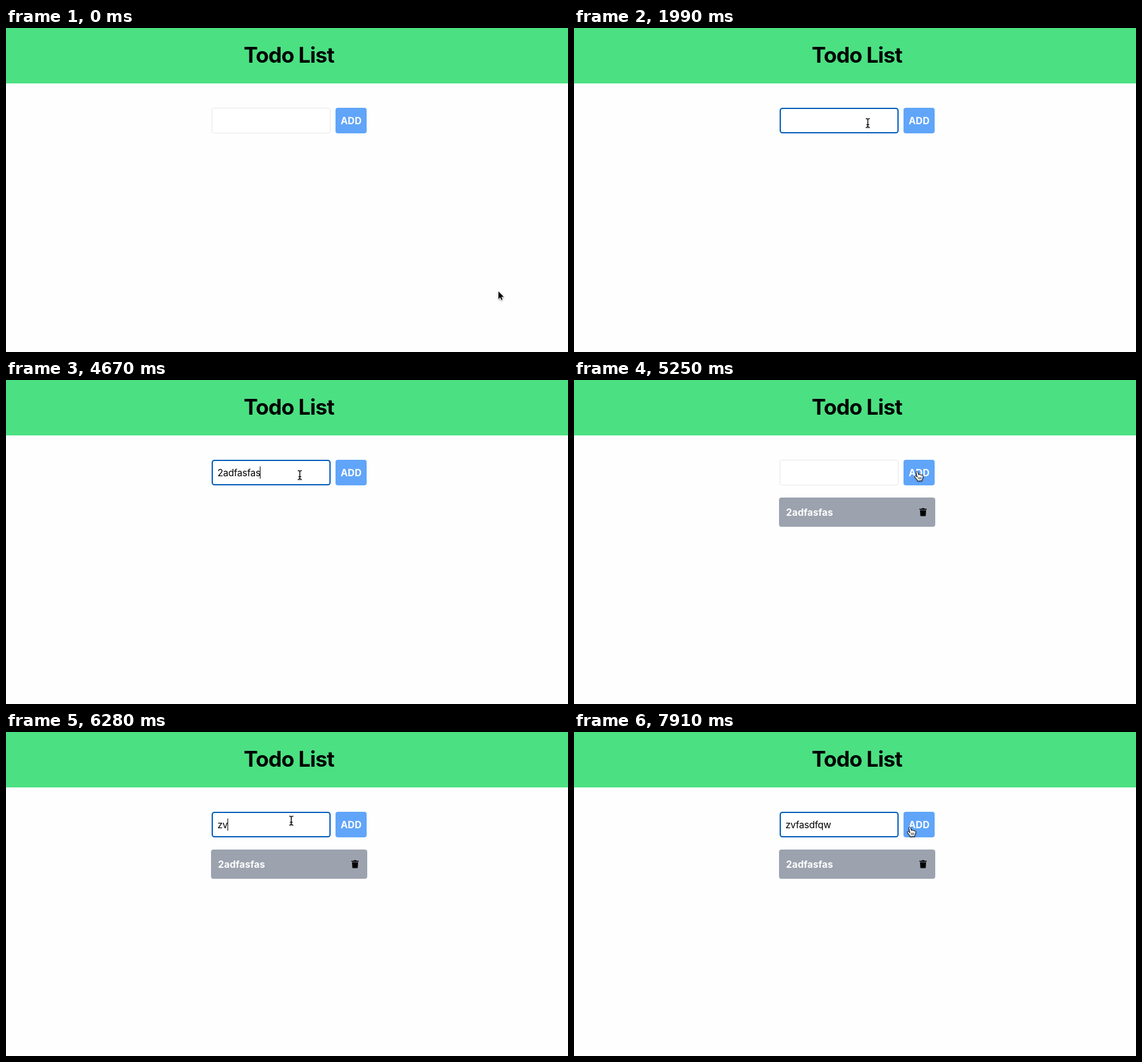
These frames come from a looping animation (921x532 px, 8 s). An HTML page:

```html
<!DOCTYPE html>
<html lang="en">
<head>
<meta charset="utf-8">
<title>Todo List</title>
<style>
  html, body { margin: 0; width: 100%; height: 100%; overflow: hidden; background: #fefefe; }
  svg { display: block; width: 921px; height: 532px; }
  text { font: 15.5px Inter, sans-serif; font-optical-sizing: none; white-space: pre; }
  .bold { font-weight: 700; letter-spacing: .01em; }
  #title { font-size: 35px; letter-spacing: -.023em; text-anchor: middle; }
  #typed { letter-spacing: -.0145em; }
  #pointer { filter: drop-shadow(0 1px 1px #0006); }
  .outlined { stroke: #fff; stroke-width: 1.6; paint-order: stroke; stroke-linejoin: round; }
</style>
</head>
<body>
<svg viewBox="0 0 921 532">
  <rect width="921" height="91" fill="#4be082"/>
  <text id="title" class="bold" x="463.6" y="57">Todo List</text>

  <rect id="field" fill="#fff"/>
  <text id="typed" x="346.5" y="158"></text>
  <rect id="caret" y="142" width="1" height="20"/>

  <rect x="540" y="131" width="51" height="42" rx="4" fill="#60a5fa"/>
  <text class="bold" x="565.6" y="158" fill="#fff" text-anchor="middle">ADD</text>

  <g id="item">
    <rect x="336" y="193" width="256" height="48" rx="4" fill="#9ca3af"/>
    <text class="bold" x="347.6" y="223" fill="#fff">2adfasfas</text>
    <path d="M566 211.5h3.4l.8-.9h3.6l.8.9h3.4v1.6h-12z
             M567 213.8h10l-.6 8.6q-.1 1.2-1.3 1.2h-6.2q-1.2 0-1.3-1.2z"/>
  </g>

  <g id="pointer">
    <path id="arrow" class="outlined" d="M0 .5V12.9L2.9 10.3 4.7 14.6 6.7 13.8 4.8 9.5H8.8Z"/>
    <path id="beam" fill="none" stroke="#000" stroke-width="1.2" stroke-linecap="round"
          d="M-2.8-7.3Q0-7.3 0-5.3V5.3Q0 7.3-2.8 7.3M2.8-7.3Q0-7.3 0-5.3M0 5.3Q0 7.3 2.8 7.3M-1.7 2.7H1.7"/>
    <g id="hand" fill="#fff" stroke="#000" stroke-linejoin="round" stroke-linecap="round">
      <path d="M4.9 9.9 3.3 2.6C2.8.4 5.2-.1 6 1.8L7.3 6.2C7.6 5 9.9 5 10 6.8 10.4 5.6 12.2 5.8 12.4 7.4
               12.8 6.4 14.4 6.6 14.5 8 14.7 11 14.2 12 12.9 14L12.6 16.3H11L10 15.2 8.8 16.4H5.6L5.2 14.8
               C3.6 13.4 2.4 11 .9 9.4 .2 8 1.8 7 2.8 7.8Z"/>
      <path d="M7.4 10.3v3M9.4 10.3v3M11.4 10.3v2.8" stroke-width=".8"/>
    </g>
  </g>
</svg>
<script>
const LOOP = 8000;
const el = id => document.getElementById(id);
const show = (id, visible) => { el(id).style.display = visible ? '' : 'none'; };
const setAttrs = (node, attrs) => {
  for (const key in attrs) node.setAttribute(key, attrs[key]);
};

const start = { text: '', focus: false, caret: false, item: false };

// Each entry changes part of the interface at the given time.
const timeline = [
  [1390, { focus: true, caret: true }],
  [1840, { caret: false }],
  [1990, { pointer: ['beam', 481.5, 156] }],
  [2440, { caret: true }],
  [2880, { caret: false }],
  [3030, { text: '2', caret: true }],
  [3480, { caret: false }],
  [4070, { text: '2a', caret: true }],
  [4220, { text: '2adf' }],
  [4370, { text: '2adfa' }],
  [4520, { text: '2adfasf' }],
  [4670, { text: '2adfasfas' }],
  [4810, { pointer: ['beam', 492, 153] }],
  [4960, { pointer: ['hand', 544, 140] }],
  [5110, { pointer: ['hand', 557.5, 149.5] }],
  [5250, { text: '', focus: false, caret: false, item: true }],
  [5540, { pointer: ['beam', 518, 150] }],
  [5690, { pointer: ['beam', 467.5, 145.5] }],
  [5830, { focus: true, caret: true }],
  [6280, { text: 'zv' }],
  [6730, { caret: false }],
  [6880, { text: 'zvfa', caret: true }],
  [7020, { text: 'zvfasdf' }],
  [7320, { text: 'zvfasdfqw' }],
  [7610, { pointer: ['beam', 474, 147] }],
  [7760, { caret: false, pointer: ['beam', 515, 157] }],
  [7910, { pointer: ['hand', 545.5, 155.5] }]
];

// The arrow glides to the field in six visible steps.
function glide(time) {
  const step = time < 500 ? 0 : Math.min(6, Math.floor((time - 500) / 148) + 1);
  const p = step / 6;
  const eased = p * p * (3 - 2 * p);
  return ['arrow', 807 - 324 * eased, 432 - 275 * eased];
}

function render(time) {
  const state = { ...start, pointer: glide(time) };
  for (const [at, change] of timeline) if (time >= at) Object.assign(state, change);

  setAttrs(el('field'), state.focus
    ? { x: 338, y: 132, width: 193, height: 40, rx: 3.5, stroke: '#005cba', 'stroke-width': 2 }
    : { x: 337.5, y: 131.5, width: 194, height: 41, rx: 3.5, stroke: '#e5e7eb', 'stroke-width': 1 });

  const typed = el('typed');
  typed.textContent = state.text;
  const textWidth = state.text ? typed.getComputedTextLength() : 0;
  el('caret').setAttribute('x', Math.floor(346.5 + textWidth));
  show('caret', state.caret);
  show('item', state.item);

  const [kind, x, y] = state.pointer;
  el('pointer').setAttribute('transform', `translate(${x} ${y})`);
  for (const name of ['arrow', 'beam', 'hand']) show(name, name === kind);
}

const began = performance.now();
function tick() {
  render((performance.now() - began) % LOOP);
  requestAnimationFrame(tick);
}
tick();
</script>
</body>
</html>
```
